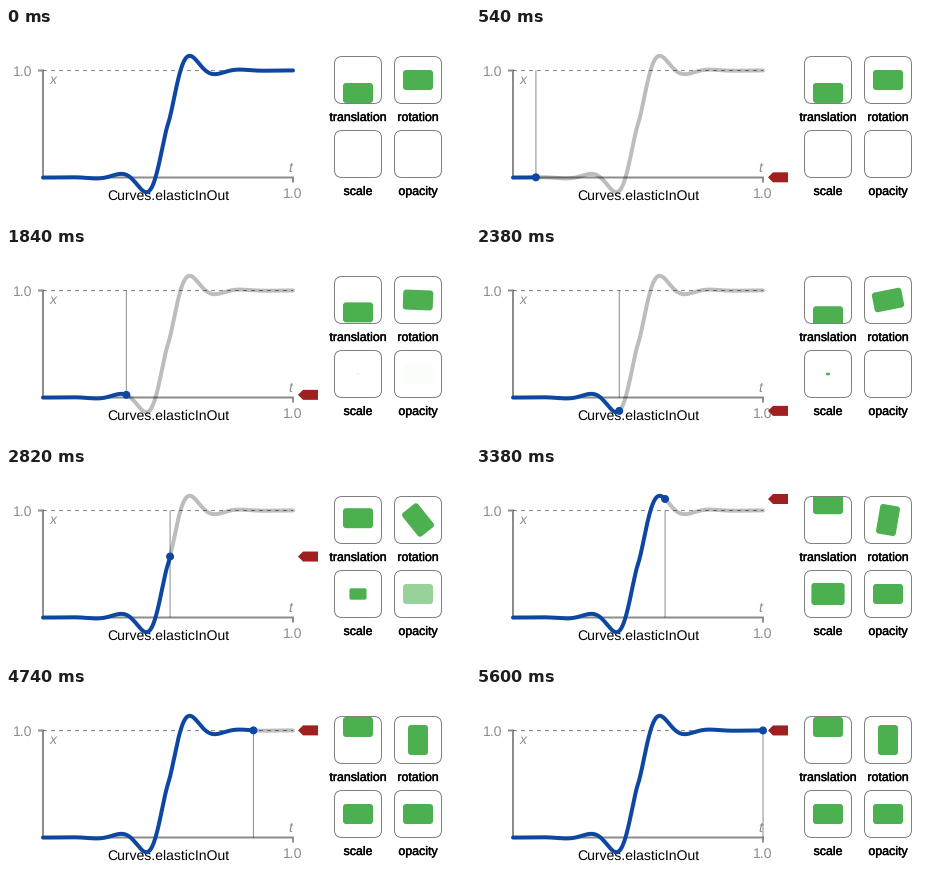
Recreate the animation shown at these times as a matplotlib script. Size 464 by 192 pixels, loop 5620 ms.

```python
import numpy as np
import matplotlib.pyplot as plt
from matplotlib.animation import FuncAnimation
from matplotlib.patches import Circle, FancyBboxPatch, Polygon
from matplotlib.patheffects import withStroke
from matplotlib.transforms import Affine2D

W, H, DPI = 464, 192, 64
PX = 72 / DPI  # points per pixel
LEFT, RIGHT, TOP, BOTTOM = 37, 287, 42.5, 149.5
UNIT = 5
STEPS, TICK, TICKS = 120, 20, 281
BLUE, GREEN, RED = "#0D47A1", "#4CAF50", "#A02020"
GREY = (0, 0, 0, 0.45)
PALE = (0, 0, 0, 0.26)

plt.rcParams.update({"font.family": "Liberation Sans", "path.snap": False,
                     "text.hinting": "none"})

fig = plt.figure(figsize=(W / DPI, H / DPI), dpi=DPI, facecolor="white")
ax = fig.add_axes([0, 0, 1, 1])
ax.set(xlim=(0, W), ylim=(H, 0))
ax.axis("off")


def elastic_in_out(t, period=0.4):
    u = 2 * np.asarray(t, float) - 1
    wave = 0.5 * 2 ** (-10 * np.abs(u)) * np.sin((u - period / 4) * 2 * np.pi / period)
    return np.where(u < 0, -wave, 1 + wave)


def to_stage(t):
    return LEFT + (RIGHT - LEFT) * t, BOTTOM - (BOTTOM - TOP) * elastic_in_out(t)


def line(xs, ys, color, width, z, cap="butt"):
    return ax.plot(xs, ys, color=color, lw=width * PX, zorder=z,
                   solid_capstyle=cap, solid_joinstyle="miter" if cap == "butt" else "round")[0]


def label(x, y, s, size=14, color=GREY, ha="center", **kw):
    return ax.text(x, y, s, fontsize=size * PX, color=color, ha=ha,
                   va="baseline", zorder=2, **kw)


def round_rect(cx, cy, w, h, r, **kw):
    return FancyBboxPatch((cx - w / 2, cy - h / 2), w, h,
                          boxstyle=f"round,pad=0,rounding_size={r}", **kw)


def tile(cx, cy, name):
    """Framed box with a caption; returns its green block, centred on the origin."""
    ax.add_patch(round_rect(cx, cy, 47, 47, 7.5, fc="none", ec="#808080", lw=PX, zorder=3))
    label(cx, cy + 41, name, 12.4, "black",
          path_effects=[withStroke(linewidth=0.4 * PX, foreground="black")])
    inner = ax.add_patch(round_rect(cx, cy, 46, 46, 7, fc="none", ec="none"))
    block = ax.add_patch(round_rect(0, 0, 30, 20, 3, fc=GREEN, ec="none", zorder=4))
    block.set_clip_path(inner)
    return block


def place(block, x, y, angle=0, scale=1):
    block.set_transform(Affine2D().scale(scale).rotate_deg(angle).translate(x, y)
                        + ax.transData)


# Axes, dashed guide and text
line([LEFT - UNIT, LEFT, LEFT, RIGHT, RIGHT],
     [TOP, TOP, BOTTOM, BOTTOM, BOTTOM + UNIT], GREY, 2, 1)
for x in range(LEFT, RIGHT, 8):
    line([x, min(x + 4, RIGHT)], [TOP, TOP], GREY, 1, 1)
label(26.5, 48, "1.0", ha="right")
label(RIGHT, 170, "1.0")
label(47, 55.5, "x", style="italic")
label(284.5, 144, "t", style="italic")
label((LEFT + RIGHT) / 2, 172, "Curves.elasticInOut", color="black")

# Moving parts of the graph
done = line([], [], BLUE, 4, 5, "round")
rest = line([], [], PALE, 4, 5, "round")
cursor = line([], [], GREY, 1, 6)
dot = ax.add_patch(Circle((0, 0), 4, fc=BLUE, ec="none", zorder=7))
marker = ax.add_patch(Polygon([(0, 0), (1, 1)], fc=RED, ec="none", zorder=7))
ARROW = UNIT * np.array([(1, 0), (2, -1), (5, -1), (5, 1), (2, 1)])

mover = tile(352, 52, "translation")
spinner = tile(412, 52, "rotation")
scaler = tile(352, 126, "scale")
fader = tile(412, 126, "opacity")
place(fader, 412, 126)


def step_at(tick):
    # Steps last 1, 5 and 1 ticks in turn
    group, r = divmod(tick, 7)
    return 3 * group + (r > 0) + (r == 6)


def update(tick):
    t = step_at(tick) / STEPS
    running = t > 0
    value = float(elastic_in_out(t)) if running else 0.0

    done.set_data(*to_stage(np.linspace(0, t if running else 1, 400)))
    for part in (rest, cursor, dot, marker):
        part.set_visible(running)
    if running:
        x, y = to_stage(t)
        rest.set_data(*to_stage(np.linspace(t, 1, 400)))
        cursor.set_data([x, x], [TOP, BOTTOM])
        dot.center = x, y
        marker.set_xy(ARROW + (RIGHT, y))

    place(mover, 352, 65 - 26 * value)
    place(spinner, 412, 52, angle=90 * value)
    scaler.set_visible(abs(value) > 1e-3)
    place(scaler, 352, 126, scale=value or 1)
    fader.set_alpha(min(max(value, 0), 1))
    return done, rest, cursor, dot, marker, mover, spinner, scaler, fader


anim = FuncAnimation(fig, update, frames=TICKS, interval=TICK, repeat=True, repeat_delay=0)
plt.show()
```
